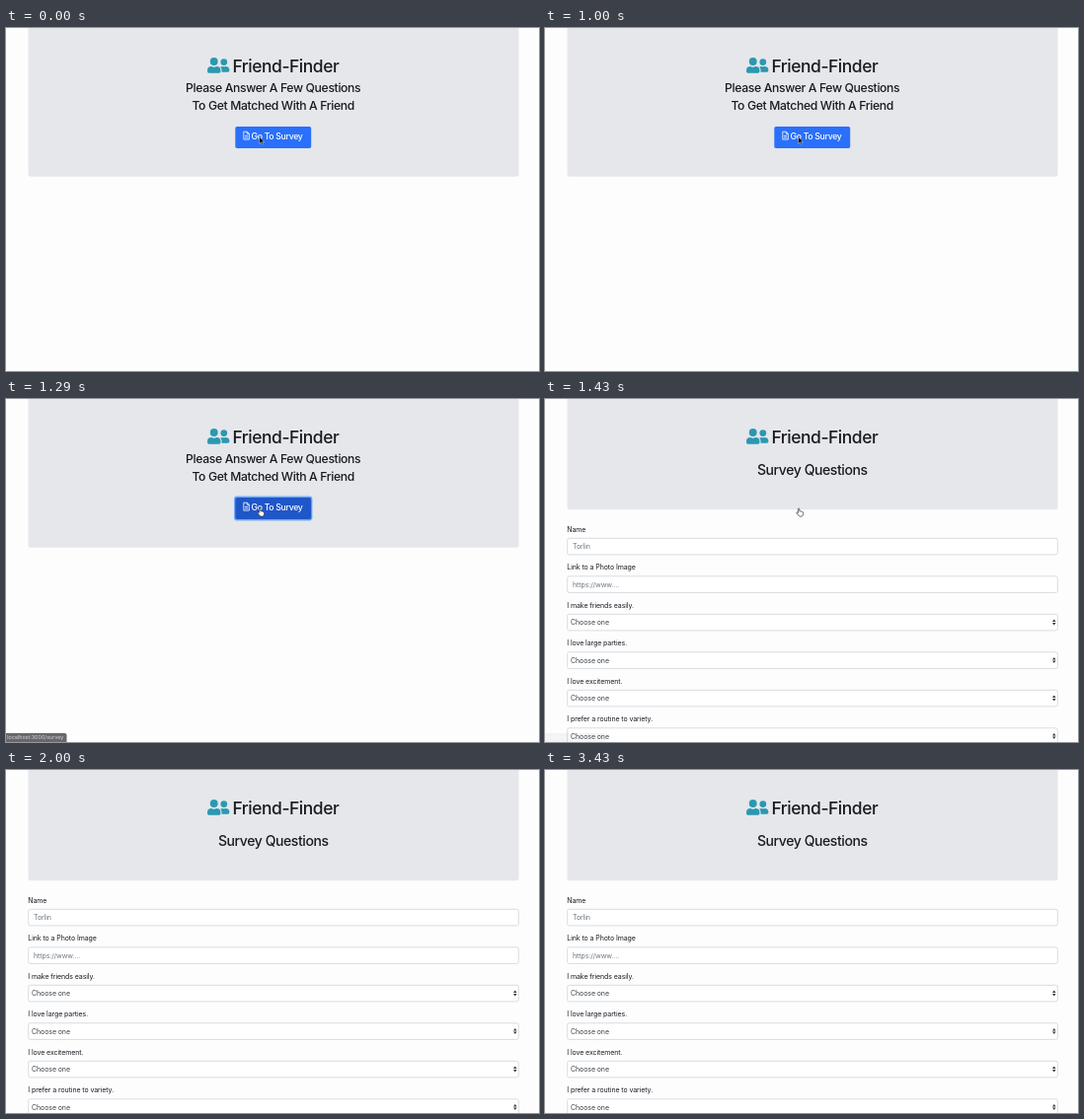
Recreate the animation shown at these times as an HTML page. Size 540 by 348 pixels, loop 7710 ms.

```html
<!DOCTYPE html>
<html lang="en">
<head>
<meta charset="utf-8">
<title>Friend-Finder</title>
<style>
  html, body { margin: 0; width: 100%; height: 100%; overflow: hidden; background: #fdfdfe; }
  svg { display: block; width: 100%; height: 100%; }
  text { font-family: Inter, "Open Sans", sans-serif; fill: #191b20; white-space: pre; }
  .title, .sub, .page { font-weight: 500; letter-spacing: -.029em; }
  .title { font-size: 17.45px; letter-spacing: -.025em; }
  .sub { font-size: 12.2px; text-anchor: middle; }
  .page { font-size: 14px; text-anchor: middle; }
  .go { font-size: 8.7px; font-weight: 500; letter-spacing: -.035em; fill: #fff; }
  .body { font-size: 7px; letter-spacing: -.013em; }
  .hint { fill: #6c757d; }
  .choice { fill: #3a4046; }
  .link { font-size: 5.4px; fill: #d6d6d9; }
  .panel { fill: #e5e7eb; }
  .field { fill: #fff; stroke: #ced4da; stroke-width: .8; }
  .teal { fill: #2b98b0; }
</style>
</head>
<body>
<svg viewBox="0 0 540 348">
  <defs>
    <g id="brand">
      <g class="teal" transform="translate(204 29) scale(.035)">
        <circle cx="192" cy="144" r="112"/>
        <path d="M115 288h9q68 32 136 0h9a115 115 0 0 1 115 115v29a48 48 0 0 1-48 48H48a48 48 0 0 1-48-48v-29a115 115 0 0 1 115-115z"/>
        <circle cx="480" cy="160" r="96"/>
        <path d="M432 288h4q44 16 88 0h4a112 112 0 0 1 112 112a48 48 0 0 1-48 48H415l1-45q0-58-40-100 26-15 56-15z"/>
      </g>
      <text class="title" x="229.4" y="45">Friend-Finder</text>
    </g>
  </defs>

  <g id="home">
    <rect class="panel" x="22.5" y="-5" width="497" height="155.7" rx="2.4"/>
    <use href="#brand"/>
    <text class="sub" x="270.7" y="64.5">Please Answer A Few Questions</text>
    <text class="sub" x="270.7" y="82.7">To Get Matched With A Friend</text>
    <rect id="ring" x="231" y="98.6" width="79.4" height="24.8" rx="2.8" fill="#72aaf6"/>
    <rect id="button" x="232.3" y="99.9" width="76.9" height="22.1" rx="1.8"/>
    <g fill="none" stroke="#fff" stroke-width=".8">
      <path d="M240.8 105.2h3.6l1.9 1.9v6h-5.5zM244.2 105.2v2.1h2.1"/>
      <path d="M242 109.4h3.1M242 111.2h3.1"/>
    </g>
    <text class="go" x="248.5" y="112.6">Go To Survey</text>
  </g>

  <g id="survey">
    <rect class="panel" x="22.5" y="-5" width="497" height="117.3" rx="2.4"/>
    <use href="#brand"/>
    <text class="page" x="270.8" y="77">Survey Questions</text>
    <g id="form"></g>
  </g>

  <g id="status">
    <path d="M0 339h59.5q2 0 2 2v7H0z" fill="#68686c"/>
    <text class="link" x="1.2" y="345.4">localhost:3000/survey</text>
  </g>
  <path id="arrow" d="M0 0V7.1L1.6 5.7L2.7 8.1L3.8 7.6L2.8 5.3H5.1Z" fill="#0b0b0d" stroke="#fff" stroke-width=".4"/>
  <path id="hand" transform="translate(254.4 110.7)" fill="#fff" stroke="#222" stroke-width=".65" stroke-linejoin="round"
    d="M2 4.8V1.1q0-.8.7-.8t.7.8V3.2q.8-.5 1.3.2q.8-.4 1.3.3q1.1-.2 1.1.9V6q0 2.2-1.4 2.4H3.4Q2.6 7.6.6 5.2q-.4-.9.4-1z"/>
</svg>
<script>
const LOOP = 7710;
const byId = id => document.getElementById(id);
const show = (id, on) => byId(id).setAttribute('visibility', on ? 'visible' : 'hidden');

const inputs = [['Name', 'Torlin'], ['Link to a Photo Image', 'https://www....']];
const questions = ['I make friends easily.', 'I love large parties.', 'I love excitement.', 'I prefer a routine to variety.'];

function row(label, value, index, isSelect) {
  const arrows = '<path d="M514 7.9l1.8-2.4 1.8 2.4zm0 1.2l1.8 2.4 1.8-2.4z" fill="#343a40"/>';
  return `<g transform="translate(0 ${141 + index * 38.5})">
    <text class="body" x="22.3" y="-6.4">${label}</text>
    <rect class="field" x="22.7" y=".3" width="496.6" height="16.6" rx="1.8"/>
    <text class="body ${isSelect ? 'choice' : 'hint'}" x="${isSelect ? 26 : 28}" y="11.1">${value}</text>
    ${isSelect ? arrows : ''}</g>`;
}

byId('form').innerHTML =
  inputs.map(([label, hint], i) => row(label, hint, i, false)).join('') +
  questions.map((label, i) => row(label, 'Choose one', i + inputs.length, true)).join('');

// Arrow pointer: [start, end, x, y]
const pointerStops = [
  [0, 1140, 256.6, 110.3],
  [1570, 1710, 261, 111.8],
  [1710, 1860, 410, 116],
  [1860, 2000, 505, 116],
  [3290, 3430, 539.2, 119]
];

function draw(t) {
  const onSurvey = t >= 1430;
  const pressed = t >= 1290 && !onSurvey;
  show('home', !onSurvey);
  show('survey', onSurvey);
  show('ring', pressed);
  byId('button').setAttribute('fill', pressed ? '#1f57c9' : t >= 1140 ? '#2463de' : '#2a70fb');

  show('status', t >= 1290 && t < 1570);
  byId('status').setAttribute('opacity', onSurvey ? .06 : 1);

  show('hand', t >= 1140 && t < 1570);
  const stop = pointerStops.find(([start, end]) => t >= start && t < end);
  show('arrow', stop);
  if (stop) byId('arrow').setAttribute('transform', `translate(${stop[2]} ${stop[3]})`);
}

function tick() {
  draw(performance.now() % LOOP);
  requestAnimationFrame(tick);
}
tick();
</script>
</body>
</html>
```
